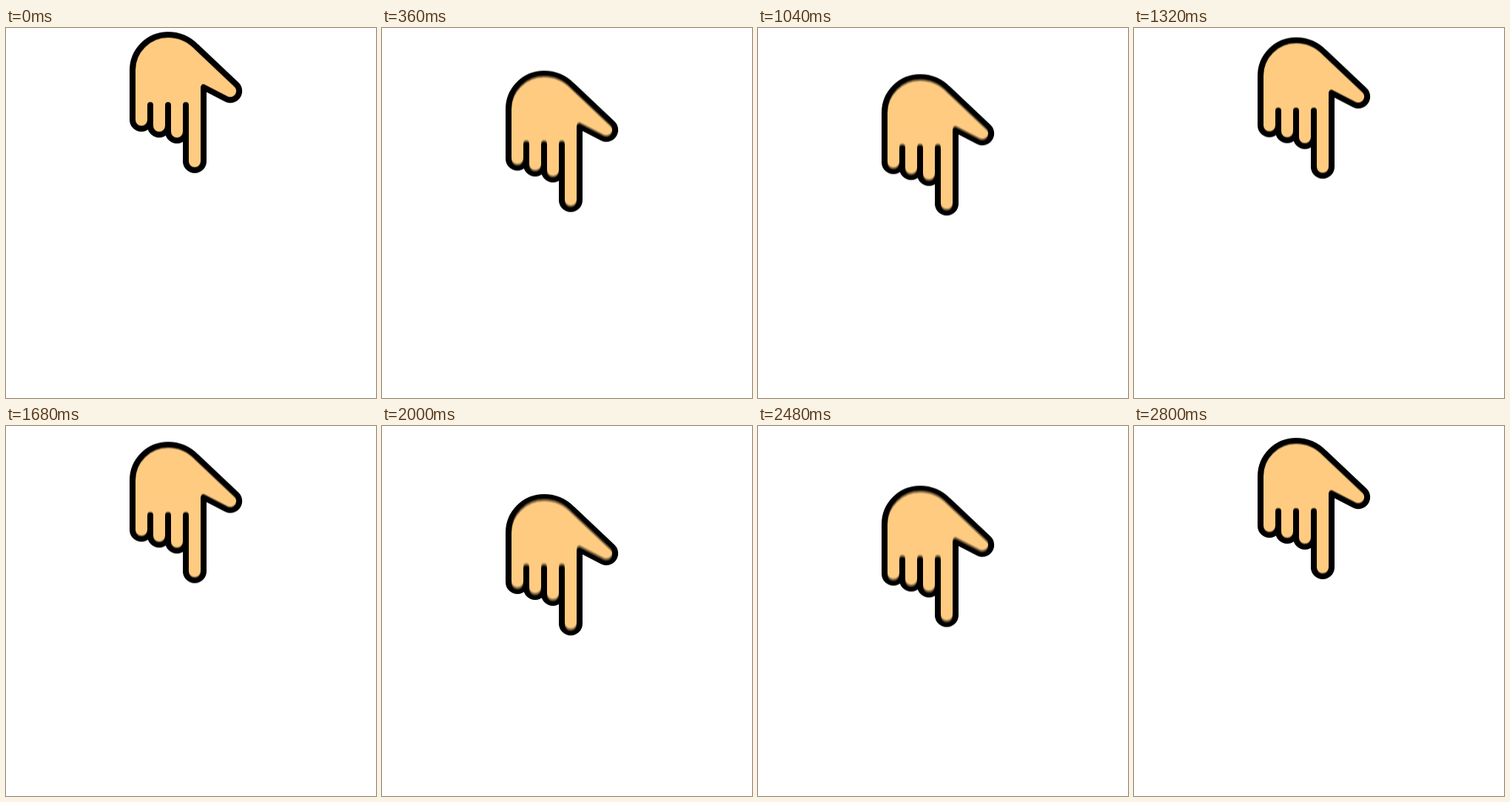
An HTML page with a canvas that plays this animation: 500x500 px, repeating every 2.84 s.

```html
<!DOCTYPE html>
<html lang="en">
<head>
<meta charset="utf-8">
<title>Pointing hand</title>
<style>
  html, body { margin: 0; width: 100%; height: 100%; overflow: hidden; background: #fff; }
  canvas { display: block; }
</style>
</head>
<body>
<canvas id="stage" width="500" height="500"></canvas>
<script>
const LOOP = 2840, STEP = 40, SHUTTER = 20, SAMPLES = 12;
const SWING = 1510, PHASE = 45, DROP = 162.5;

const ctx = document.getElementById('stage').getContext('2d');
const hand = drawHand();

function drawHand() {
  const canvas = document.createElement('canvas');
  canvas.width = 500;
  canvas.height = 220;
  const pen = canvas.getContext('2d');
  const outline = new Path2D(`M171 57 A48 48 0 0 1 219 9 C233 9 247 15 257 25
    L311.5 76.5 A12 12 0 0 1 297.5 95.7 L267 80
    V180 A12 12 0 0 1 243 180 V140 A12 12 0 0 1 219 140
    V132 A12 12 0 0 1 195 132 V124 A12 12 0 0 1 171 124 Z`);
  const gaps = new Path2D('M195 104 V132 M219 104 V140 M243 104 V180');
  pen.fillStyle = '#ffcc80';
  pen.lineWidth = 8;
  pen.lineCap = pen.lineJoin = 'round';
  pen.fill(outline);
  pen.stroke(outline);
  pen.stroke(gaps);
  return canvas;
}

// Accelerates downwards, turns sharply and slows on the way back up.
function offset(time) {
  const x = (time + PHASE) % SWING / (SWING / 2);
  return DROP * Math.min(x, 2 - x) ** 1.78 - 1;
}

function render(time) {
  ctx.globalAlpha = 1;
  ctx.globalCompositeOperation = 'source-over';
  ctx.clearRect(0, 0, 500, 500);
  ctx.drawImage(hand, 0, offset(time));

  // Motion blur stays inside the sharp silhouette.
  ctx.globalCompositeOperation = 'source-atop';
  for (let i = 0; i < SAMPLES; i++) {
    ctx.globalAlpha = 1 / (i + 1);
    ctx.drawImage(hand, 0, offset(time + SHUTTER * ((i + 0.5) / SAMPLES - 0.5)));
  }
}

const start = performance.now();
function tick() {
  const time = (performance.now() - start) % LOOP;
  render(Math.floor(time / STEP) * STEP);
  requestAnimationFrame(tick);
}
tick();
</script>
</body>
</html>
```
